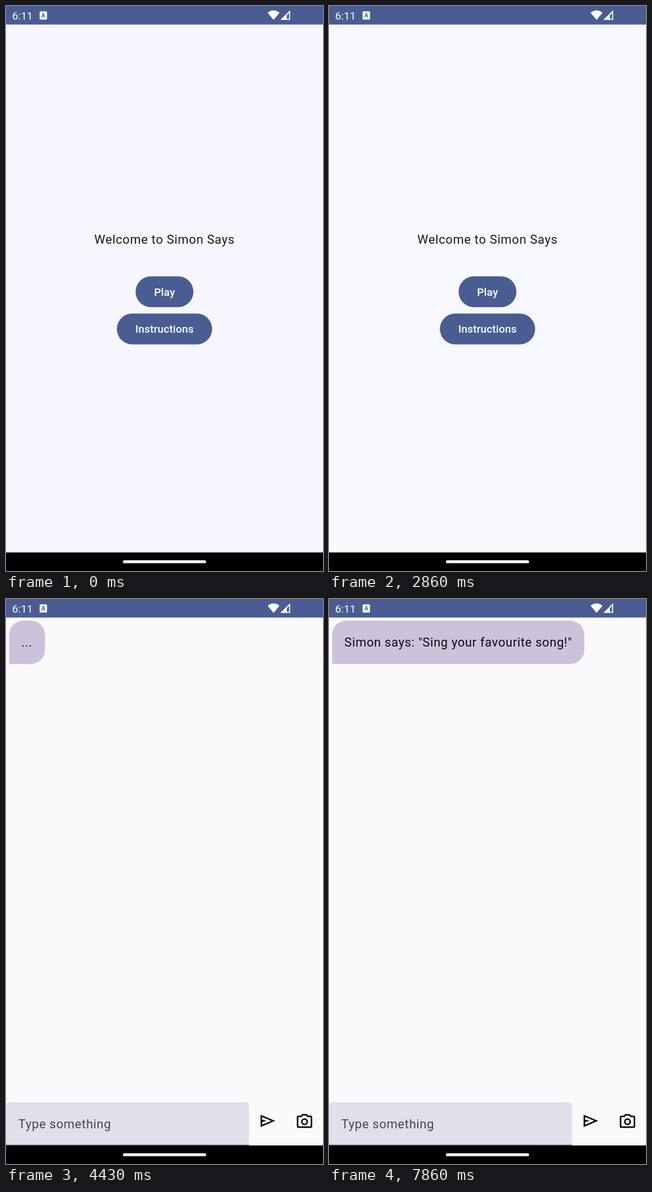
Animation, 561 px wide and 998 px high, one loop 8000 ms. Source, as an HTML page with a canvas:

```html
<!DOCTYPE html>
<html lang="en">
<head>
<meta charset="utf-8">
<title>Party game chat</title>
<style>
html, body { margin: 0; width: 100%; height: 100%; overflow: hidden; background: #fbf9fc; }
canvas { display: block; width: 561px; height: 998px; }
</style>
</head>
<body>
<canvas id="stage" width="561" height="998"></canvas>
<script>
const ctx = document.getElementById('stage').getContext('2d');
const W = 561, H = 998, LOOP = 8000;
const DP = W / 411.43; // layout unit: the screen is 411 units wide
const NAV = 3860, NAV_LENGTH = 490, REPLY = 6570;
const BLUE = '#495d92', INK = '#1a1b21';

const SEND = new Path2D('M120-160v-640l760 320-760 320Zm80-120 474-200-474-200v140l240 60-240 60v140Z');
const CAMERA = new Path2D('M160-120q-33 0-56.5-23.5T80-200v-480q0-33 23.5-56.5T160-760h126l74-80h240l74 80h126' +
  'q33 0 56.5 23.5T880-680v480q0 33-23.5 56.5T800-120H160Zm0-80h640v-480H638l-73-80H395l-73 80H160v480Z' +
  'M480-260a180 180 0 1 0 0-360a180 180 0 0 0 0 360ZM480-340a100 100 0 1 0 0-200a100 100 0 0 0 0 200Z');

const clamp = v => Math.min(1, Math.max(0, v));
const mix = (a, b, k) => `rgb(${a.map((v, i) => v + (b[i] - v) * k).join(',')})`;

// Cubic bezier (0.4, 0, 0.2, 1), solved for x by bisection.
function ease(x) {
  if (x <= 0 || x >= 1) return clamp(x);
  let lo = 0, hi = 1, s;
  for (let i = 0; i < 24; i++) {
    s = (lo + hi) / 2;
    const bx = 1.2 * s * (1 - s) ** 2 + 0.6 * s * s * (1 - s) + s ** 3;
    if (bx < x) lo = s; else hi = s;
  }
  return 3 * s * s * (1 - s) + s ** 3;
}

function box(x, y, w, h, r, color) {
  ctx.fillStyle = color;
  ctx.beginPath();
  ctx.roundRect(x, y, w, h, r);
  ctx.fill();
}

function poly(color, ...points) {
  ctx.fillStyle = color;
  ctx.beginPath();
  points.forEach(([x, y]) => ctx.lineTo(x, y));
  ctx.fill();
}

function label(str, x, y, { size = 16 * DP, weight = 400, gap = DP / 2, color = INK, align = 'left' } = {}) {
  ctx.font = `${weight} ${size}px Roboto, sans-serif`;
  ctx.letterSpacing = gap + 'px';
  ctx.textAlign = align;
  ctx.fillStyle = color;
  ctx.fillText(str, x, y);
}

function icon(path, cx, cy) {
  const s = 24 * DP / 960;
  ctx.save();
  ctx.translate(cx - 480 * s, cy + 480 * s);
  ctx.scale(s, s);
  ctx.fillStyle = '#08080a';
  ctx.fill(path, 'evenodd');
  ctx.restore();
}

function button(str, y, w, color) {
  const h = 40 * DP;
  box((W - w) / 2, y, w, h, h / 2, color);
  label(str, W / 2, y + h / 2 + 6.8, { size: 14 * DP, weight: 500, gap: DP / 10, color: '#fff', align: 'center' });
}

function welcome(t) {
  label('Welcome to Simon Says', W / 2, 419.6, { align: 'center' });
  button('Play', 477.5, 102.4, t < NAV ? BLUE : '#7580ab');
  button('Instructions', 543.2, 168.6, BLUE);
}

function chat(t) {
  const replied = t >= REPLY, r = 25;
  box(4 * DP, 38.3, replied ? 446.5 : 63.6, 76.4, [r, r, r, 0], '#ccc2dc');
  label(replied ? 'Simon says: "Sing your favourite song!"' : '...', 20 * DP, 84, { color: '#0c0b10' });
  box(0, 889, 430, 76.3, [4 * DP, 4 * DP, 0, 0], '#dfe0ec');
  box(0, 963.9, 430, DP, 0, '#44464f');
  label('Type something', 16 * DP, 934.7, { color: '#44464f' });
  icon(SEND, W - 72 * DP, 921.8);
  icon(CAMERA, W - 24 * DP, 922);
}

function systemBars() {
  const h = 24 * DP;
  box(0, 0, W, h, 0, BLUE);
  label('6:11', 10.8, 24, { size: 14 * DP, gap: 0, color: '#fff' });

  box(59.5, 9.5, 13, 14.5, 1.5, '#fff');
  label('A', 66, 20, { size: 10.5, weight: 700, gap: 0, color: BLUE, align: 'center' });
  box(63, 21.3, 6, 1, 0, '#a9b4d2');

  ctx.fillStyle = '#fff';
  ctx.beginPath();
  ctx.moveTo(473.5, 24.6);
  ctx.lineTo(463, 12);
  ctx.quadraticCurveTo(473.5, 3.6, 484, 12);
  ctx.fill();

  poly('#fff', [485.5, 24.6], [502.8, 7.6], [502.8, 24.6]);
  poly(BLUE, [497, 16.2], [501, 12.2], [501, 22.8], [497, 22.8]);

  box(0, H - h, W, h, 0, '#000');
  box((W - 108 * DP) / 2, 978.9, 108 * DP, 4 * DP, 2 * DP, '#f0f0f4');
}

function draw(t) {
  const k = ease((t - NAV) / NAV_LENGTH);
  const home = [247, 247 - 2 * (1 - clamp(t / 450)), 254];
  box(0, 0, W, H, 0, mix(home, [251, 249, 252], k));
  if (k < 1) {
    ctx.globalAlpha = 1 - k;
    welcome(t);
  }
  if (k > 0) {
    ctx.globalAlpha = k;
    chat(t);
  }
  ctx.globalAlpha = 1;
  systemBars();
}

const start = performance.now();
function tick() {
  draw((performance.now() - start) % LOOP);
  requestAnimationFrame(tick);
}
tick();
</script>
</body>
</html>
```
